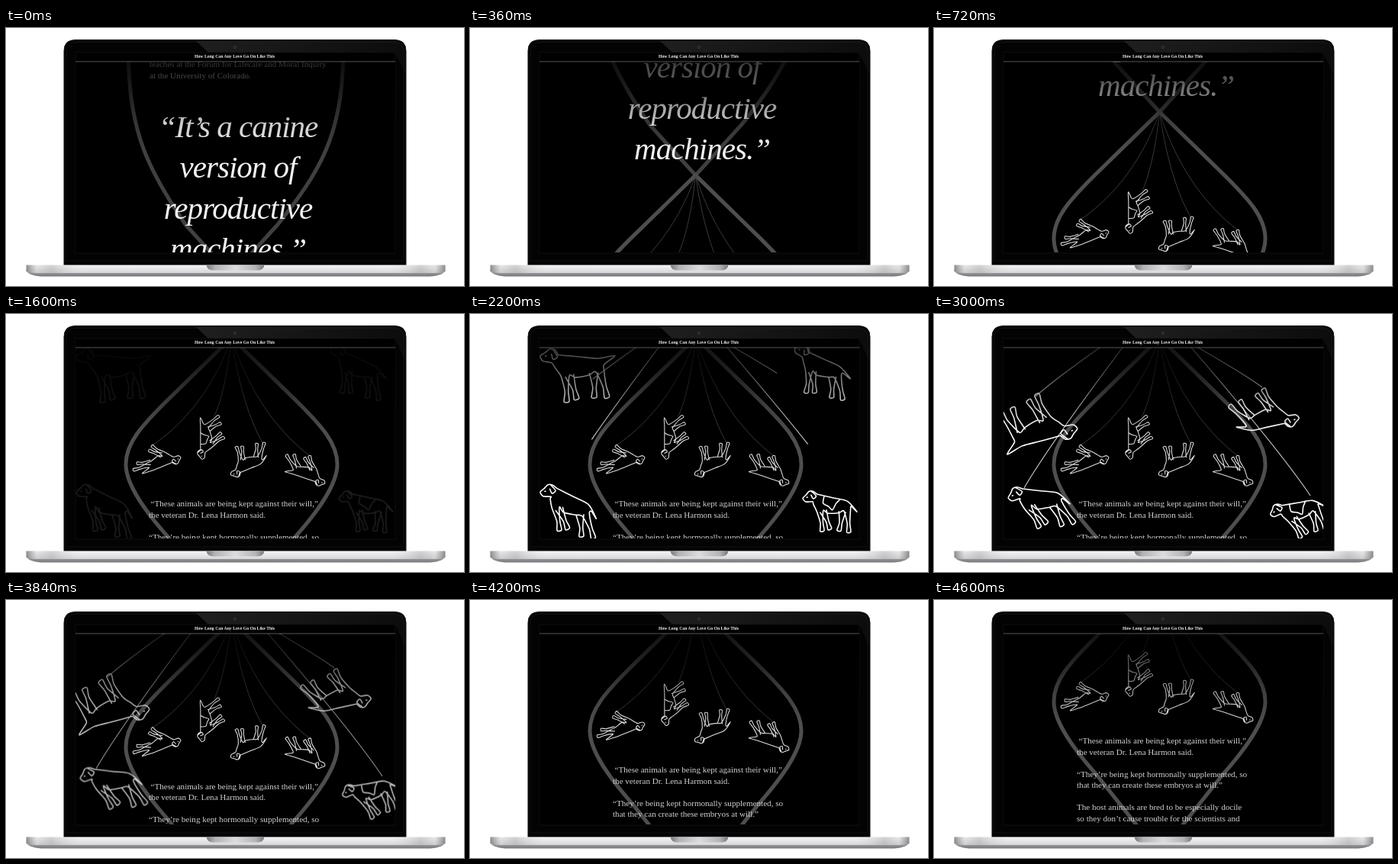
An HTML page for the animation above (4680 ms loop, 600 px wide and 338 px high).

```html
<!DOCTYPE html>
<html lang="en">
<head>
<meta charset="utf-8">
<title>Scrolling story on a laptop</title>
<style>
html, body { margin: 0; width: 100%; height: 100%; overflow: hidden; background: #fff; }
svg { display: block; width: 100vw; height: 100vh; }
.line { fill: none; stroke-linecap: round; stroke-linejoin: round; }
.strand { stroke: #4e4e4e; stroke-width: 5; }
.far { stroke: #404040; }
.thread { stroke: #484848; stroke-width: .8; }
.pup { stroke: #dcdcdc; }
.dog { stroke: #fff; }
.wire { fill: none; stroke: #d0d0d0; stroke-width: 1.1; }
.body { font: 11.1px "Liberation Serif", serif; fill: #d0d0d0; }
.quote { font: italic 41px "Liberation Serif", serif; letter-spacing: -1px; fill: #f2f2f2; text-anchor: middle; }
.head { font: bold 5.75px "Liberation Serif", serif; fill: #eee; text-anchor: middle; }
</style>
</head>
<body>
<svg viewBox="0 0 600 338" preserveAspectRatio="none">
  <defs>
    <clipPath id="view"><rect x="91" y="44.5" width="419" height="249.5"/></clipPath>
    <linearGradient id="shade" x1="0" y1="0" x2="0" y2="1">
      <stop offset="0" stop-color="#000" stop-opacity=".76"/>
      <stop offset=".25" stop-color="#000" stop-opacity=".6"/>
      <stop offset=".7" stop-color="#000" stop-opacity=".16"/>
      <stop offset="1" stop-color="#000" stop-opacity="0"/>
    </linearGradient>
    <linearGradient id="glare" x1="0" y1="0" x2="1" y2="0">
      <stop offset="0" stop-color="#1f1f20"/>
      <stop offset="1" stop-color="#0c0c0d"/>
    </linearGradient>
    <linearGradient id="metal" x1="0" y1="0" x2="0" y2="1">
      <stop offset="0" stop-color="#f6f6f7"/>
      <stop offset="1" stop-color="#d6d6d9"/>
    </linearGradient>
    <linearGradient id="under" x1="0" y1="0" x2="0" y2="1">
      <stop offset="0" stop-color="#b0b0b3"/>
      <stop offset="1" stop-color="#77777b"/>
    </linearGradient>
    <linearGradient id="ends" x1="0" y1="0" x2=".5" y2="0" spreadMethod="reflect">
      <stop offset="0" stop-color="#555" stop-opacity=".65"/>
      <stop offset=".05" stop-color="#777" stop-opacity=".1"/>
      <stop offset=".12" stop-color="#777" stop-opacity=".28"/>
      <stop offset=".3" stop-color="#fff" stop-opacity="0"/>
    </linearGradient>
    <linearGradient id="notch" x1="0" y1="0" x2=".5" y2="0" spreadMethod="reflect">
      <stop offset="0" stop-color="#77777b"/>
      <stop offset=".3" stop-color="#b4b4b7"/>
      <stop offset="1" stop-color="#dcdcde"/>
    </linearGradient>
  </defs>

  <path d="M76 311V30Q76 15.5 91 15.5H509Q524 15.5 524 30V311Z" fill="#030304" stroke="#1c1c1f"/>
  <path d="M249 17H509Q522 17 522.5 30V60L510 32H265Z" fill="url(#glare)"/>
  <path d="M79 305V31Q79 18.5 92 18.5H508Q521 18.5 521 31V305Z" fill="none" stroke="#1d1e21" stroke-width=".6"/>
  <circle cx="300" cy="25" r="2" fill="#3c3c42"/>
  <circle cx="300" cy="25" r=".9" fill="#111"/>
  <rect x="91" y="32" width="419" height="263" stroke="#141517" stroke-width=".7"/>

  <g clip-path="url(#view)">
    <g id="page"></g>
    <g id="pack"></g>
    <rect x="91" y="44" width="419" height="116" fill="url(#shade)"/>
  </g>
  <text class="head" x="299.5" y="39.3">How Long Can Any Love Go On Like This</text>
  <path d="M91 44H510" stroke="#6a6a6a" stroke-width=".8"/>

  <path d="M26.5 317H575.5Q574 324 556 325.5H46Q28 324 26.5 317Z" fill="url(#under)"/>
  <path d="M26.5 310.5H575.5V319Q570 321 556 321H46Q32 321 26.5 319Z" fill="url(#metal)"/>
  <path d="M26.5 310.5H575.5V319Q570 321 556 321H46Q32 321 26.5 319Z" fill="url(#ends)"/>
  <path d="M262.5 310.5H338.5Q337 317.5 330 317.5H271Q264 317.5 262.5 310.5Z" fill="url(#notch)"/>
</svg>
<script>
const LOOP = 4680, MID = 295.5;
const $ = id => document.getElementById(id);
const clamp = v => Math.max(0, Math.min(1, v));
const part = (t, from, to) => clamp((t - from) / (to - from));
const smooth = p => p * p * (3 - 2 * p);
const easeOut = p => 1 - (1 - p) * (1 - p);
const mix = (a, b, p) => a + (b - a) * p;
const rad = deg => deg * Math.PI / 180;

// Angles are measured from straight down.
const reach = (x, y, deg, len) => [x + len * Math.sin(rad(deg)), y + len * Math.cos(rad(deg))];

// A soft curve through the points.
function curve(pts) {
  const at = i => pts[Math.max(0, Math.min(pts.length - 1, i))];
  return 'M' + pts[0] + pts.slice(1).map((c, i) => {
    const a = at(i - 1), b = at(i), e = at(i + 2);
    const c1 = b.map((v, k) => (v + (c[k] - a[k]) / 8).toFixed(1));
    const c2 = c.map((v, k) => (v - (e[k] - b[k]) / 8).toFixed(1));
    return `C${c1} ${c2} ${c}`;
  }).join('');
}

// One leg: down the rear edge, round the paw, up the front edge.
function leg(x, y, deg, len) {
  const side = (w, along) => {
    const [px, py] = reach(x, y, deg, along);
    return [px + w * Math.cos(rad(deg)), py - w * Math.sin(rad(deg))];
  };
  return [side(5, 0), side(2, len * .6), side(2, len), side(-4, len), side(-2, len * .6), side(-5, 0)];
}

// A dog facing left, with its withers at 0,0.
function dogShape({ front, hind, tail, nod = 0, patch }) {
  const c = Math.cos(rad(nod)), s = Math.sin(rad(nod));
  const head = pts => pts.map(([x, y]) => [x * c - y * s, x * s + y * c]);
  const back = [[-2, -2], [22, 0], [44, 2]];
  const skull = head([[-10, 7], [-20, 5], [-23, -1], [-17, -5], [-12, -9], [-6, -8]]);
  const strokes = [
    [...back, reach(50, 5, tail, 15), [51, 9], ...leg(46, 16, hind, 32), [34, 21], [18, 24],
      ...leg(6, 22, front, 30), [-5, 14], ...skull, back[0]],
    leg(39, 19, hind - 14, 28),
    leg(11, 22, front + 14, 28),
    head([[-8, -8], [-3, 0], [-8, 3], [-10, -3]]),
    head([[-17, -1], [-16, -1]])
  ];
  if (patch) strokes.push([[9, 0], [9, 10], [18, 14], [24, 18], [28, 8], [33, 1]]);
  return strokes.map(curve).join('');
}

const line = (cls, d, more = '') => `<path class="line ${cls}" d="${d}" ${more}/>`;
const text = (cls, x, y, s) => `<text class="${cls}" x="${x}" y="${y}">${s}</text>`;
const place = (x, y, turn, sx, sy = sx) => `translate(${x} ${y}) rotate(${turn}) scale(${sx} ${sy})`;

// Half a loop of the big ribbon; side is -1 or 1.
function ribbon(side, top) {
  const x = w => MID + side * w;
  return line('strand far', `M${x(top)} -330V-249C${x(top - 2)} -155 ${x(top * .8)} -105 ${x(60)} -35L${x(0)} 31`) +
    line('strand', `M${x(0)} 31L${x(80)} 109C${x(120)} 148 ${x(138.5)} 170 ${x(138.5)} 197` +
      `C${x(138.5)} 225 ${x(110)} 262 ${x(82.5)} 293L${x(30)} 359L${x(0)} 396`);
}

const thread = ([x, y]) =>
  line('thread', `M${MID} 31C${mix(MID, x, .25)} ${mix(31, y, .53)} ${mix(MID, x, .68)} ${mix(31, y, .84)} ${x} ${y}`);

// Wires hang from the top edge and reach a little above it.
function wire(x0, [x, y]) {
  const cx = mix(x, x0, .25), cy = mix(44, y, .7);
  const up = `${mix(x0, cx, -.25)} ${mix(44, cy, -.25)}`;
  return `<path class="wire" pathLength="1" d="M${up}L${x0} 44Q${cx} ${cy} ${x} ${y}"/>`;
}

const pups = [
  { at: [216, 194], turn: 153, front: 30, hind: 83, tail: 86, tip: [192, 172] },
  { at: [256, 176], turn: -95, front: 27, hind: 37, tail: 97, patch: true, tip: [273, 134] },
  { at: [308, 206], turn: -18, flip: true, front: 3, hind: 38, tail: 48, tip: [338, 172] },
  { at: [404, 218], turn: 194, front: 35, hind: 50, tail: 98, tip: [397, 185] }
];
// Each dog goes from standing (at, turn) to hanging (to, hung).
const dogs = [
  { at: [118, 56], turn: 0, to: [163, 158], hung: 160, size: 1.13, front: 5, hind: 17, tail: 115, from: 217, tip: [133, 108] },
  { at: [115, 231], turn: 22, to: [118, 231], hung: 2, size: 1, front: 33, hind: 42, tail: 45, nod: -30, from: 247, tip: [118, 228] },
  { at: [446, 53], turn: 20, to: [457, 142], hung: 163, size: .95, front: 14, hind: 34, tail: 60, from: 346, tip: [430, 96] },
  { at: [456, 238], turn: 8, to: [458, 252], hung: -14, size: .88, front: 16, hind: 14, tail: 45, nod: -20, patch: true, from: 337, tip: [493, 238] }
];
const quote = ['“It’s a canine', 'version of', 'reproductive', 'machines.”'];
const intro = ['teaches at the Forum for Lifecare and Moral Inquiry', 'at the University of Colorado.'];
const prose = [
  ['“These animals are being kept against their will,”', 'the veteran Dr. Lena Harmon said.'],
  ['“They’re being kept hormonally supplemented, so', 'that they can create these embryos at will.”'],
  ['The host animals are bred to be especially docile', 'so they don’t cause trouble for the scientists and']
];

const pupSize = .62;
$('page').innerHTML =
  ribbon(-1, 135) + ribbon(1, 146) +
  pups.map(p => thread(p.tip)).join('') +
  pups.map(p => line('pup', dogShape(p), `stroke-width="${1.1 / pupSize}" transform="${
    place(...p.at, p.turn, pupSize, p.flip ? -pupSize : pupSize)}"`)).join('') +
  quote.map((s, i) => text('quote', 304, -150 + 53.3 * i, s)).join('') +
  intro.map((s, i) => text('body', 188, -242 + 14.7 * i, s)).join('') +
  prose.map((lines, i) => lines.map((s, k) =>
    text('body', i + k ? 187 : 189.5, 252 + 43.5 * i + 14.5 * k, s)).join('')).join('');
$('pack').innerHTML =
  dogs.map(d => wire(d.from, d.tip)).join('') +
  dogs.map(d => line('dog', dogShape(d), `stroke-width="${1.6 / d.size}"`)).join('');
const wires = [...document.querySelectorAll('.wire')];
const bodies = [...document.querySelectorAll('.dog')];

function draw(t) {
  const drift = 64 * Math.pow(part(t, 3640, 4600), 1.7);
  const y = 293 - 214 * smooth(Math.pow(part(t, 0, 720), .8)) - 79 * smooth(part(t, 880, 1320)) - drift;
  $('page').setAttribute('transform', `translate(0 ${y.toFixed(2)})`);

  const pack = $('pack');
  pack.setAttribute('opacity', part(t, 1580, 1760) * (1 - smooth(part(t, 3700, 4120))));
  pack.setAttribute('transform', `translate(0 ${(-1.6 * drift).toFixed(2)})`);

  const grow = easeOut(part(t, 1960, 2480));
  wires.forEach(w => {
    w.setAttribute('visibility', grow > 0 ? 'visible' : 'hidden');
    w.setAttribute('stroke-dasharray', grow < 1 ? `${grow} 2` : 'none');
  });

  const swing = smooth(part(t, 2500, 3000));
  dogs.forEach((d, i) => {
    const [x, y] = d.at.map((v, k) => mix(v, d.to[k], swing));
    bodies[i].setAttribute('transform', place(x, y, mix(d.turn, d.hung, swing), d.size));
  });
}

const start = performance.now();
function tick() {
  draw((performance.now() - start) % LOOP);
  requestAnimationFrame(tick);
}
draw(0);
requestAnimationFrame(tick);
</script>
</body>
</html>
```
